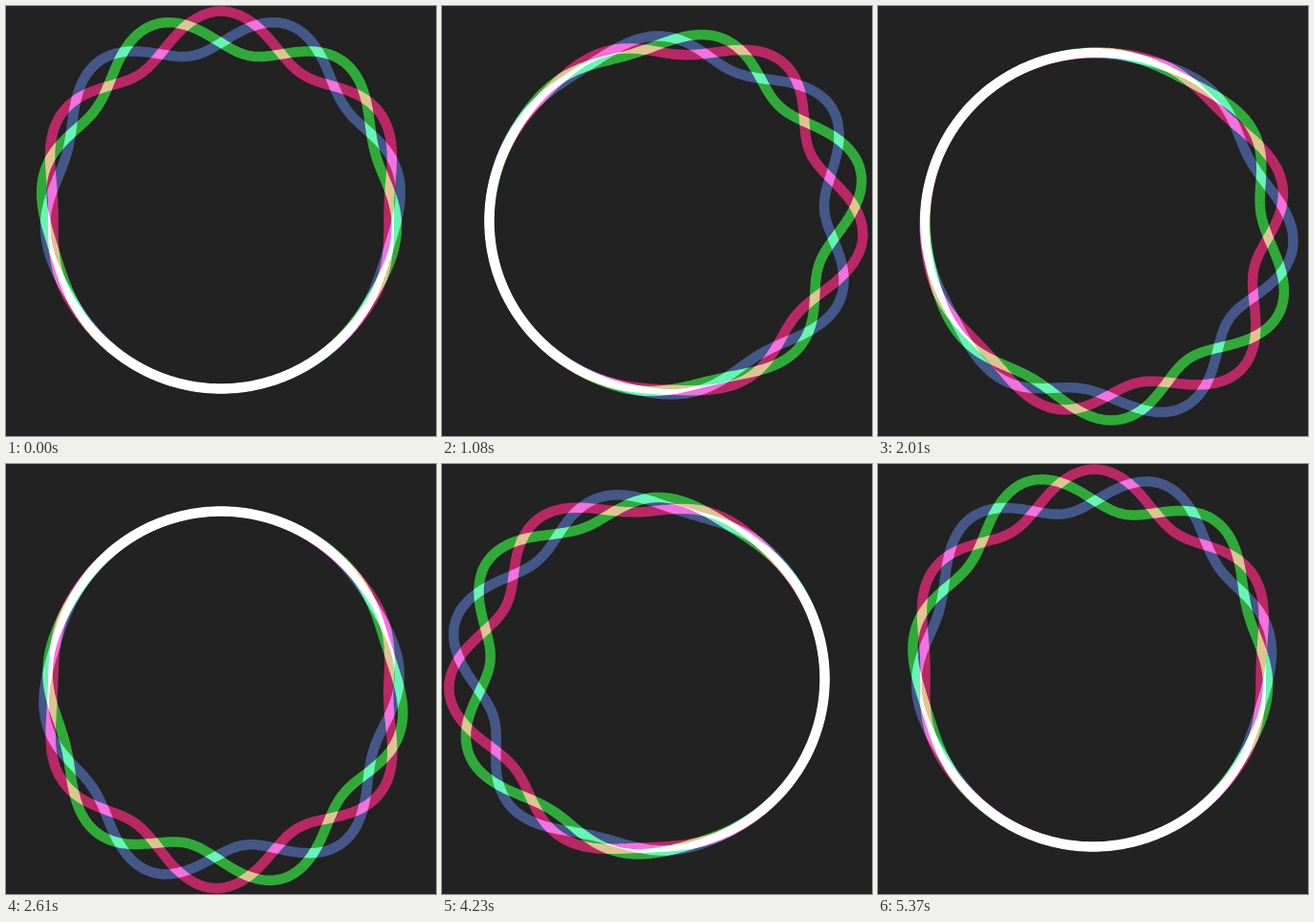
These frames come from a looping animation (450x450 px, 5.4 s). An HTML page with a canvas:

```html
<!DOCTYPE html>
<html lang="en">
<head>
<meta charset="utf-8">
<title>Circle wave</title>
<style>
  html, body { margin: 0; width: 100%; height: 100%; overflow: hidden; background: #222; }
  canvas { display: block; width: 450px; height: 450px; }
</style>
</head>
<body>
<canvas id="stage" width="450" height="450"></canvas>
<script>
const TAU = 2 * Math.PI;
const LOOP = 5400;
const STEP = 30;
const CENTER = 225;
const RADIUS = 175.5;
const SWELL = 22;
const WAVES = 6;
const POINTS = 480;
const COLORS = ["rgb(225,41,119)", "rgb(51,205,64)", "rgb(76,101,163)"];

const ctx = document.getElementById("stage").getContext("2d");
ctx.lineWidth = 10.5;
ctx.lineJoin = "round";
ctx.globalAlpha = 0.8;
ctx.globalCompositeOperation = "lighter";

// Angles run clockwise from the top; the swell turns one way, the ripples the other.
function radiusAt(angle, turn, phase) {
  const swell = SWELL * ((1 + Math.cos(angle - turn)) / 2) ** 2;
  return RADIUS + swell * (1 + Math.cos(WAVES * angle + 2 * turn + phase));
}

function drawRing(color, turn, phase) {
  ctx.beginPath();
  for (let i = 0; i < POINTS; i++) {
    const angle = i / POINTS * TAU;
    const r = radiusAt(angle, turn, phase);
    ctx.lineTo(CENTER + r * Math.sin(angle), CENTER - r * Math.cos(angle));
  }
  ctx.closePath();
  ctx.strokeStyle = color;
  ctx.stroke();
}

function render(ms) {
  const turn = Math.floor(ms % LOOP / STEP) * STEP / LOOP * TAU;
  ctx.clearRect(0, 0, 450, 450);
  COLORS.forEach((color, i) => drawRing(color, turn, i * TAU / 3));
}

const start = performance.now();
function tick() {
  render(performance.now() - start);
  requestAnimationFrame(tick);
}
tick();
</script>
</body>
</html>
```
